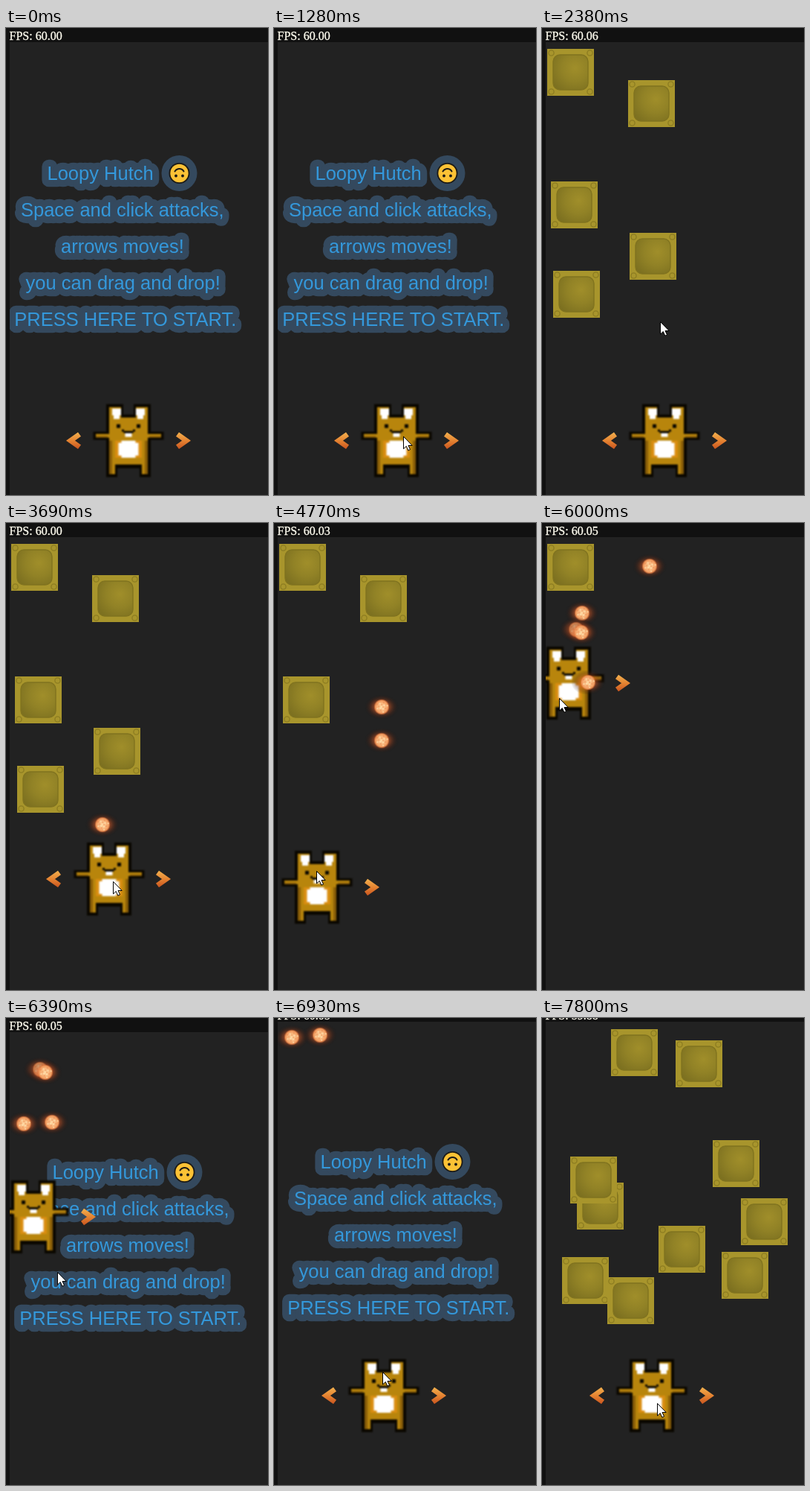
These frames come from a looping animation (353 px wide and 627 px high, 8000 ms). An HTML page with a canvas:

```html
<!DOCTYPE html>
<html lang="en">
<head>
<meta charset="utf-8">
<title>Bunny game</title>
<style>
  html, body { margin: 0; width: 100%; height: 100%; overflow: hidden; background: #111; }
  canvas { display: block; }
</style>
</head>
<body>
<canvas id="stage" width="353" height="627"></canvas>
<script>
const LOOP = 8000, START = 2370, GRAB = 2700, DROP = 6620, SCROLL = 6760, RESTART = 7150;
const SPEED = 0.19, LAG = 80, MUZZLE = 44, SIZE = 63;
const HOME = [166, 554];
const ctx = document.getElementById('stage').getContext('2d');

const fps = [[0, '60.00'], [1715, '60.06'], [3000, '60.00'], [4450, '60.03'],
  [5500, '60.05'], [7300, '59.88']];

// Mouse stops: time, x, y. The bunny trails the mouse while it is held.
const mouse = [
  [140, 264, 190], [900, 176, 541], [1900, 174, 562], [2140, 145, 314], [2370, 160, 393],
  [2700, 166, 554], [2830, 166, 566], [3140, 128, 470], [3500, 130, 474], [3690, 145, 481],
  [4000, 145, 480], [4170, 48, 492], [4680, 59, 489], [5050, 54, 345], [5240, 54, 292],
  [5360, 45, 292], [5400, 55, 292], [5770, 62, 292], [5910, 37, 214], [6000, 24, 235],
  [6230, 24, 235], [6620, 149, 521], [6930, 147, 475], [7120, 160, 390], [7560, 156, 517]];

const makeCrate = ([x, y]) => ({ x, y, hit: Infinity });
const firstCrates = [[7, 28], [116, 70], [12, 206], [118, 275], [15, 326]].map(makeCrate);
const nextCrates = [[93, 29], [180, 44], [230, 178], [47, 235], [38, 200], [157, 293],
  [268, 256], [242, 328], [27, 335], [88, 362]].map(makeCrate);

const lines = [[55.5, 'Loopy Hutch'], [20, 'Space and click attacks,'], [74, 'arrows moves!'],
  [26.5, 'you can drag and drop!'], [11.3, 'PRESS HERE TO START.']];

function mouseAt(t) {
  const i = mouse.findIndex(stop => stop[0] > t);
  if (i <= 0) return mouse[i ? mouse.length - 1 : 0].slice(1);
  const [t0, x0, y0] = mouse[i - 1], [t1, x1, y1] = mouse[i];
  const k = (t - t0) / (t1 - t0), ease = k * k * (3 - 2 * k);
  return [x0 + (x1 - x0) * ease, y0 + (y1 - y0) * ease];
}

function bunnyAt(t) {
  return t - LAG < GRAB ? HOME : mouseAt(Math.min(t - LAG, DROP));
}

// Every shot flies straight up and ends at the first crate still standing in its way.
const shots = [3558, 3770, 4012, 4260, 5130, 5332, 5447, 5468, 5821, 6135].map(birth => {
  const [x, by] = bunnyAt(birth), y = by - MUZZLE;
  const hit = firstCrates
    .filter(c => c.hit === Infinity && x > c.x && x < c.x + SIZE && c.y + SIZE < y)
    .sort((a, b) => b.y - a.y)[0];
  let end = LOOP;
  if (hit) end = hit.hit = birth + (y - hit.y - SIZE) / SPEED;
  return { x, y, birth, end };
});
const cleared = Math.max(...firstCrates.map(c => c.hit));

// Renders a picture once; (0,0) is the centre of the sprite.
function sprite(w, h, draw) {
  const c = document.createElement('canvas');
  c.width = w;
  c.height = h;
  const g = c.getContext('2d');
  g.translate(w / 2, h / 2);
  draw(g);
  return c;
}

function put(img, x, y) {
  ctx.drawImage(img, Math.round(x - img.width / 2), Math.round(y - img.height / 2));
}

function rect(g, color, x, y, w, h) {
  g.fillStyle = color;
  g.fillRect(x, y, w, h);
}

function disc(g, x, y, r, color) {
  g.fillStyle = color;
  g.beginPath();
  g.arc(x, y, r, 0, 7);
  g.fill();
}

function radial(g, x, y, r, ...stops) {
  const grad = g.createRadialGradient(x, y, 0, x, y, r);
  for (const [at, color] of stops) grad.addColorStop(at, color);
  return grad;
}

const sharpBunny = sprite(104, 104, g => {
  const ink = '#0a0700', fur = '#b8850c', shade = '#8a5e08', white = '#fff';
  const pair = (color, x, y, w, h) => {
    rect(g, color, x, y, w, h);
    rect(g, color, -x - w, y, w, h);
  };
  const mid = (color, y, w, h) => rect(g, color, -w / 2, y, w, h);
  pair(ink, -30, -49, 23, 22);
  mid(ink, -35, 60, 72);
  mid(ink, -12, 95, 11);
  pair(ink, -30, 28, 15, 21);
  pair(fur, -26, -45, 16, 22);
  mid(fur, -31, 52, 63);
  mid(fur, -9, 88, 5);
  pair(fur, -26, 26, 8, 19);
  pair(shade, -26, 0, 4, 45);
  pair(shade, -44, -6, 16, 2);
  mid('#d98d10', 0, 36, 23);
  pair(white, -22, -43, 12, 9);
  pair(white, -20, -34, 8, 5);
  mid(white, 3, 27, 17);
  mid(white, 0, 19, 23);
  pair(ink, -16, -22, 5, 5);
  mid(ink, -13, 13, 3);
  pair(ink, -9, -15, 3, 3);
  mid(white, -10, 9, 5);
});
const bunny = sprite(104, 104, g => {
  g.filter = 'blur(0.9px)';
  g.drawImage(sharpBunny, -52, -52);
});

const arrow = dir => sprite(30, 30, g => {
  const grad = g.createLinearGradient(0, -11, 0, 11);
  grad.addColorStop(0, '#f2b04e');
  grad.addColorStop(0.5, '#e58432');
  grad.addColorStop(1, '#c9551f');
  g.scale(dir, 1);
  g.strokeStyle = grad;
  g.lineWidth = 7;
  g.beginPath();
  g.moveTo(-7, -8.5);
  g.lineTo(5, 0);
  g.lineTo(-7, 8.5);
  g.stroke();
});
const left = arrow(-1), right = arrow(1);

const crate = sprite(SIZE, SIZE, g => {
  rect(g, '#a8952c', -SIZE / 2, -SIZE / 2, SIZE, SIZE);
  g.strokeStyle = '#8d7d22';
  g.lineWidth = 1.4;
  for (const x of [-26, 26]) for (const y of [-26, 26]) {
    g.beginPath();
    g.arc(x, y, 3.6, 0, 7);
    g.stroke();
  }
  g.fillStyle = radial(g, 6, -6, 36, [0, '#a08e2a'], [0.5, '#918226'], [1, '#7c7020']);
  g.beginPath();
  g.roundRect(-23.5, -23.5, 47, 47, 9);
  g.fill();
  g.strokeStyle = '#80731f';
  g.stroke();
});

const ball = sprite(48, 32, g => {
  g.save();
  g.scale(1.35, 1);
  disc(g, 0, 0, 17, radial(g, 0, 0, 17, [0, 'rgba(225,105,45,.8)'], [0.5, 'rgba(190,80,35,.5)'],
    [0.75, 'rgba(90,40,22,.3)'], [1, 'rgba(30,22,20,0)']));
  g.restore();
  disc(g, 0, 0, 10.5, radial(g, 0, 0, 10.5, [0, '#ffdca6'], [0.5, '#f9b67c'],
    [0.8, '#f09a5e'], [1, 'rgba(225,115,55,.2)']));
  for (let i = 0; i < 14; i++) {
    const a = i * 2.4, r = 2 + i * 0.45;
    disc(g, Math.cos(a) * r, Math.sin(a) * r, 1.2, i % 2 ? 'rgba(255,235,190,.5)' : 'rgba(230,120,65,.35)');
  }
});

const menu = sprite(353, 260, g => {
  g.translate(-176.5, -130);
  g.font = '25.5px "Liberation Sans", Arial, sans-serif';
  g.lineJoin = 'round';
  g.lineWidth = 18.5;
  g.strokeStyle = '#34495e';
  g.fillStyle = '#3498db';
  lines.forEach(([x, text], i) => {
    const y = 43.5 + i * 49;
    g.strokeText(text, x, y);
    g.fillText(text, x, y);
  });
  g.translate(233.5, 35);
  disc(g, 0, 0, 24, '#34495e');
  disc(g, 0, 0, 14, '#1c1a16');
  disc(g, 0, 0, 12.2, '#fcc235');
  disc(g, -4.5, 3.5, 1.9, '#1c1a16');
  disc(g, 4.5, 3.5, 1.9, '#1c1a16');
  g.strokeStyle = '#1c1a16';
  g.lineWidth = 2;
  g.lineCap = 'round';
  g.beginPath();
  g.arc(0, 1, 7, Math.PI * 1.17, Math.PI * 1.83);
  g.stroke();
});

const pointer = new Path2D('M0 0V16.5L3.8 13L6.3 18.7L9 17.5L6.5 12H11.7Z');

function drawCursor(t) {
  if (t < mouse[0][0]) return;
  const [x, y] = mouseAt(t);
  ctx.save();
  ctx.translate(Math.round(x) - 0.5, Math.round(y) + 0.5);
  ctx.fillStyle = '#fff';
  ctx.strokeStyle = '#000';
  ctx.lineWidth = 1;
  ctx.fill(pointer);
  ctx.stroke(pointer);
  ctx.restore();
}

function drawGame(t) {
  if (t < START) put(menu, 176.5, 290);
  else if (t >= cleared && t < RESTART) put(menu, 183.5, 302);
  else for (const c of t < cleared ? firstCrates : nextCrates) {
    if (t < c.hit) ctx.drawImage(crate, c.x, c.y);
  }

  const [x, y] = bunnyAt(t);
  put(left, x - 74, y);
  put(right, x + 72, y);
  put(bunny, x - 0.6, y);

  for (const s of shots) {
    if (t >= s.birth && t < s.end) put(ball, s.x, s.y - SPEED * (t - s.birth));
  }
}

function drawFps(t) {
  const text = 'FPS: ' + fps.filter(f => f[0] <= t).pop()[1];
  ctx.font = '16px "Liberation Serif", "Times New Roman", serif';
  ctx.fillStyle = ctx.strokeStyle = '#fffdf0';
  ctx.lineWidth = 0.35;
  ctx.fillText(text, 4.5, 16);
  ctx.strokeText(text, 4.5, 16);
}

function draw(t) {
  rect(ctx, '#111', 0, 0, 353, 627);
  ctx.save();
  if (t >= SCROLL) ctx.translate(0, -14);
  drawFps(t);
  ctx.beginPath();
  ctx.rect(5, 19, 348, 640);
  ctx.clip();
  rect(ctx, '#222', 5, 19, 348, 640);
  drawGame(t);
  ctx.restore();
  drawCursor(t);
}

const begin = performance.now();
function tick() {
  draw((performance.now() - begin) % LOOP);
  requestAnimationFrame(tick);
}
tick();
</script>
</body>
</html>
```
